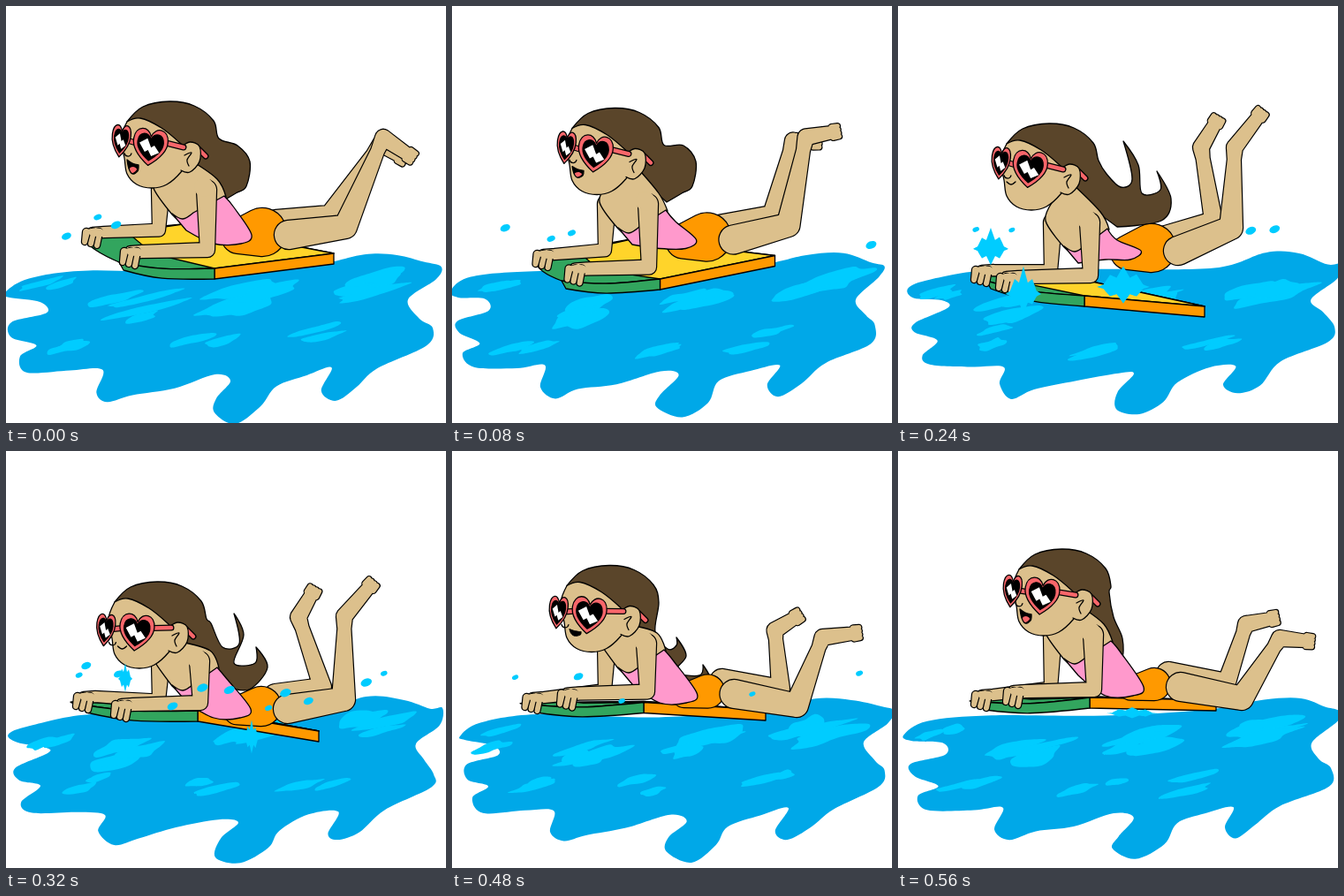
Recreate the animation shown at these times as an HTML page with a canvas. Size 498 by 472 pixels, loop 640 ms.

```html
<!DOCTYPE html>
<html lang="en">
<head>
<meta charset="utf-8">
<title>Bodyboard ride</title>
<style>
html, body { margin: 0; width: 100%; height: 100%; overflow: hidden; background: #fff; }
canvas { display: block; }
</style>
</head>
<body>
<canvas id="stage" width="498" height="472"></canvas>
<script>
const ctx = document.getElementById('stage').getContext('2d');
const STEP = 80;
const C = { sea: '#00a8e8', foam: '#00ccff', skin: '#dcc08c', hair: '#5a452a', red: '#f8666a',
  pink: '#ff99cc', orange: '#ff9900', yellow: '#ffd42a', green: '#32a55e' };

// Joints of the rider and corners of the board; everything else is built from them.
// hip: x, y, seat size; arm: hand x, elbow y; legs: knee, heel, toes; drops: left, middle, right.
const poses = [{
  head: [0, 0], nod: 0, smile: 1, shoulder: [227, 208], arm: [136, 276], hip: [318, 259, 27],
  leg: [[384, 250], [427, 149], [455, 168]], farLeg: [[366, 236], [424, 156], [446, 170]],
  nose: [95, 262], front: [128, 290], seam: [236, 297], tail: [371, 280], back: [200, 247],
  hair: '262,158 276,176 272,204 260,212 243,222!', swell: [-6, 4], splashes: [], drops: [3, 0, 0]
}, {
  head: [-2, 15], nod: 0, smile: .6, shoulder: [217, 240], arm: [133, 315], hip: [315, 270, 27],
  leg: [[377, 246], [374, 148], [406, 118]], farLeg: [[358, 236], [348, 149], [372, 137]],
  nose: [106, 312], front: [120, 332], seam: [235, 321], tail: [360, 285], back: [210, 280],
  hair: '246,182 260,202 276,188 262,149! 283,180 285,200 301,190 296,174! 313,200 296,230 245,237!',
  swell: [-8, -8], splashes: [[105, 342, 75, 70], [225, 350, 130, 30]], drops: [2, 0, 1]
}, {
  head: [-14, 25], nod: 0, smile: 0, shoulder: [217, 245], arm: [118, 305], hip: [315, 277, 27],
  leg: [[377, 251], [381, 160], [408, 125]], farLeg: [[357, 243], [343, 160], [359, 133]],
  nose: [92, 305], front: [100, 311], seam: [211, 328], tail: [347, 340], back: [215, 311],
  hair: '236,190 252,205 265,196 255,153! 272,180 276,212 297,208 293,187! 309,218 298,243 248,250!',
  swell: [6, -3], splashes: [[105, 275, 40, 25], [142, 326, 40, 32], [255, 318, 60, 26]], drops: [2, 0, 2]
}, {
  head: [-14, 40], nod: .7, smile: 0, shoulder: [219, 238], arm: [126, 285], hip: [317, 292, 22],
  leg: [[382, 281], [383, 187], [411, 154]], farLeg: [[358, 267], [331, 188], [346, 162]],
  nose: [85, 284], front: [86, 287], seam: [217, 294], tail: [354, 317], back: [217, 292],
  hair: '232,195 245,222 264,218 258,184! 269,208 258,240 282,240 283,222! 296,245 275,270 248,266!',
  swell: [-1, 0], splashes: [[135, 258, 16, 20], [278, 325, 18, 24]], drops: [3, 6, 2]
}, {
  head: [-14, 40], nod: 1, smile: 0, shoulder: [219, 228], arm: [126, 275], hip: [317, 283, 19],
  leg: [[391, 296], [407, 210], [447, 198]], farLeg: [[372, 276], [337, 210], [354, 188]],
  nose: [85, 288], front: [86, 290], seam: [217, 290], tail: [350, 304], back: [217, 289],
  hair: '230,205 244,224 254,220 254,211! 265,232 252,250 280,254 284,242! 292,260 270,264 248,262!',
  swell: [2, 0], splashes: [], drops: [3, 4, 1]
}, {
  head: [0, 3], nod: .2, smile: 1, shoulder: [221, 208], arm: [126, 270], hip: [318, 267, 18],
  leg: [[389, 280], [432, 212], [462, 215]], farLeg: [[372, 262], [394, 196], [422, 190]],
  nose: [92, 282], front: [94, 284], seam: [217, 279], tail: [360, 282], back: [217, 278],
  hair: '239,160 244,188 254,212 253,235 238,225!', swell: [4, -6],
  splashes: [[265, 297, 60, 8]], drops: [0, 0, 0]
}];

const SEA = points('4,322 30,309 100,299 230,300 350,295 410,280 450,281 480,291 497,293 492,309 463,332 474,350 487,364 482,382 428,406 402,430 378,442 364,432 376,408 345,413 311,428 296,450 266,467 240,458 244,440 262,420 242,416 195,428 150,437 122,446 107,432 114,410 80,410 30,410 20,396 40,381 14,372 12,358 50,344 45,334 12,330');
const FOAM = [[140, 342], [275, 330], [415, 315], [225, 382], [350, 378], [45, 325], [90, 375]];

function points(text) {
  return text.split(' ').map(token => {
    const p = token.replace('!', '').split(',').map(Number);
    p.sharp = token.endsWith('!');
    return p;
  });
}
const corner = (x, y) => Object.assign([x, y], { sharp: true });
const add = (p, x, y) => [p[0] + x, p[1] + y];
const mix = (a, b, t = .5) => a.map((v, i) => v + (b[i] - v) * t);

function between(a, b) {
  if (typeof a === 'number') return (a + b) / 2;
  if (Array.isArray(a)) return a.length === b.length ? a.map((v, i) => between(v, b[i])) : a;
  if (typeof a === 'string') return a;
  return Object.fromEntries(Object.keys(a).map(key => [key, between(a[key], b[key])]));
}

const [rise, crest, drop, dip, settle, glide] = poses;
const cycle = [rise, between(rise, crest), crest, drop, dip, settle, between(settle, glide), glide];

function random(seed) {
  let s = seed * 7919 + 17;
  return (low = 0, high = 1) => {
    s = (s * 16807) % 2147483647;
    return low + (high - low) * s / 2147483647;
  };
}

// Smooth curve through the points, straight tangents dropped at corners and open ends.
function trace(pts, closed = true) {
  const n = pts.length, path = new Path2D();
  const slope = i => pts[i].sharp || (!closed && (i === 0 || i === n - 1)) ? [0, 0]
    : [0, 1].map(k => (pts[(i + 1) % n][k] - pts[(i + n - 1) % n][k]) / 6);
  path.moveTo(...pts[0]);
  for (let i = 0; i < (closed ? n : n - 1); i++) {
    const j = (i + 1) % n, [a, b] = [pts[i], pts[j]], [s, t] = [slope(i), slope(j)];
    path.bezierCurveTo(a[0] + s[0], a[1] + s[1], b[0] - t[0], b[1] - t[1], b[0], b[1]);
  }
  return path;
}

function paint(path, fill, outline = true) {
  if (fill) { ctx.fillStyle = fill; ctx.fill(path); }
  if (outline) { ctx.strokeStyle = '#000'; ctx.lineWidth = 1.3; ctx.stroke(path); }
}

function polygon(...pts) {
  const path = new Path2D();
  pts.forEach(p => path.lineTo(p[0], p[1]));
  path.closePath();
  return path;
}

function bar(from, to) {
  const path = polygon(from, to);
  for (const [color, width] of [['#000', 7], [C.red, 4.5]]) {
    ctx.strokeStyle = color;
    ctx.lineWidth = width;
    ctx.stroke(path);
  }
}

// Tapered segment around two joints [x, y, radius].
function capsule(path, [ax, ay, ar], [bx, by, br]) {
  const angle = Math.atan2(by - ay, bx - ax);
  const spread = Math.acos(Math.max(-1, Math.min(1, (ar - br) / Math.hypot(bx - ax, by - ay))));
  const part = new Path2D();
  part.arc(ax, ay, ar, angle + spread, angle - spread + 2 * Math.PI);
  part.arc(bx, by, br, angle - spread, angle + spread);
  part.closePath();
  path.addPath(part);
}

function limb(joints, color = C.skin, path = new Path2D()) {
  joints.slice(1).forEach((joint, i) => capsule(path, joints[i], joint));
  ctx.strokeStyle = '#000';
  ctx.lineWidth = 2.4;
  ctx.stroke(path);
  paint(path, color, false);
}

function drawLeg(hip, [knee, heel, toe], thick) {
  const angle = Math.atan2(toe[1] - heel[1], toe[0] - heel[0]);
  const toes = new Path2D();
  for (let i = -1.5; i <= 1.5; i++) {
    const base = add(toe, -Math.sin(angle) * i * 4, Math.cos(angle) * i * 4);
    capsule(toes, [...base, 3], [...add(base, Math.cos(angle) * 7, Math.sin(angle) * 7), 2.6]);
  }
  limb([[...hip, thick + 3], [...knee, thick], [...mix(knee, heel, .85), 7.5], [...heel, 9], [...toe, 7]], C.skin, toes);
}

function drawArm(shoulder, elbow, hand, thick) {
  limb([[...shoulder, thick + 2], [...elbow, thick - 1], [...add(hand, 18, -4), thick - 2], [...add(hand, 5, -3), thick - 2]]);
  for (let i = 2; i >= 0; i--)
    limb([[...add(hand, i * 7 - 2, -4), 4], [...add(hand, i * 7 - 4, thick - 1 + i * 2), 3]]);
  paint(trace([add(hand, 0, -7), add(hand, 14, -8), add(hand, 21, 0), add(hand, 4, 0)]), C.skin, false);
}

function heart(w, h) {
  const path = new Path2D();
  path.moveTo(0, h * .5);
  for (const side of [-1, 1]) {
    const x = side * w, up = side < 0;
    const knots = [[.2, .36], [.52, .1], [.5, -.2], [.48, -.56], [.1, -.6]].map(([u, v]) => [u * x, v * h]);
    if (!up) knots.reverse();
    path.bezierCurveTo(...knots[0], ...knots[1], ...knots[2]);
    path.bezierCurveTo(...knots[3], ...knots[4], 0, up ? -h * .3 : h * .5);
  }
  return path;
}

function drawLens([x, y], w, h) {
  ctx.save();
  ctx.translate(x, y);
  ctx.rotate(.12);
  paint(heart(w, h), C.red);
  paint(heart(w * .75, h * .73), '#000');
  paint(polygon(...[[-.32, -.1], [-.1, -.24], [.03, 0], [.12, -.06], [.28, .12], [.06, .24], [-.05, .08], [-.14, .14]]
    .map(([u, v]) => [u * w, v * h])), '#fff', false);
  ctx.restore();
}

function drawHead({ head: [dx, dy], nod, smile }) {
  ctx.save();
  ctx.translate(dx, dy);
  bar([218, 162], [226, 170]);
  paint(trace(points('137,131! 152,127 176,138 198,156! 205,175 198,188 182,202 165,206 148,202 137,190 134,172 130,150')), C.skin);
  paint(trace(points('198,160 208,154 219,159 219,176 208,188 198,186'), false), C.skin);
  paint(trace(points('202,169 210,166 205,174 207,181'), false));

  const left = [130 - 5 * nod, 153 + 14 * nod], right = [163 - 2 * nod, 160 + 8 * nod];
  const nose = new Path2D();
  nose.arc(left[0] + 8, left[1] + 13, 4, .2, 3);
  paint(nose);
  bar(add(right, 18, -5), [201, 160]);
  bar(add(left, 7, -1), add(right, -16, -5));
  drawLens(left, 21, 36);
  drawLens(right, 39, 41);

  ctx.translate(137 + 5 * nod, 174 + 10 * nod);
  if (smile > .3) {
    ctx.scale(1, smile);
    paint(trace(points('0,0! 6,4 13,6! 12,13 6,16 2,10')), '#000');
    if (smile > .7) paint(trace(points('3,10 7,8 11,11 6,15')), C.red, false);
  } else paint(trace(points('0,0 5,3 10,0'), false));
  ctx.restore();
}

function drawSea({ swell: [sx, sy] }, step) {
  paint(trace(SEA.map(([x, y], i) => [
    x + sx + 2 * Math.sin(i * 1.7 + step * 2.4),
    y + sy * (y - 270) / 190 + 2 * Math.cos(i * 2.3 + step)
  ])), C.sea, false);

  const rnd = random(step + 3);
  FOAM.forEach(([x, y], i) => {
    for (let k = 0; k < (i < 3 ? 4 : 2); k++) {
      const length = rnd(14, i < 3 ? 52 : 30), thick = rnd(4, i < 3 ? 11 : 6), pts = [];
      const cx = x + rnd(-25, 25), cy = y + rnd(-12, 12);
      for (let a = 0; a < 10; a++) {
        const turn = a * Math.PI / 5, r = rnd(.65, 1.15), u = Math.cos(turn) * length * r;
        pts.push([cx + u, cy + Math.sin(turn) * thick * r - u * .25]);
      }
      paint(trace(pts), C.foam, false);
    }
  });
}

function drawSpray({ splashes, drops }, step) {
  const rnd = random(step + 11);
  for (const [x, y, w, h] of splashes) {
    const rim = (side, reach) => Array.from({ length: 9 }, (_, i) => {
      const t = i / 8, rise = Math.sin(t * Math.PI) ** 1.5 * reach * (i % 2 ? .45 : rnd(.8, 1));
      return corner(x + side * (t - .5) * w, y - side * rise);
    });
    paint(trace([...rim(1, h), ...rim(-1, Math.min(h, 30) * .8)]), C.foam, false);
  }
  const zones = [[60, 130, 238, 264], [155, 370, 268, 300], [398, 438, 250, 272]];
  zones.forEach(([x0, x1, y0, y1], z) => {
    for (let i = 0; i < drops[z]; i++) {
      const blob = new Path2D(), r = rnd(3, 5.5);
      blob.ellipse(x0 + (x1 - x0) * (i + rnd()) / drops[z], rnd(y0, y1), r * 1.2, r * .8, -.4, 0, 7);
      paint(blob, C.foam, false);
    }
  });
}

function drawBoard({ nose, front, seam, tail, back }) {
  const sharp = p => corner(p[0], p[1]), under = p => corner(p[0], p[1] + 12);
  const belly = add(mix(front, seam, .45), 0, 4);
  const split = mix(nose, back, .4);
  paint(trace([nose, sharp(back), sharp(tail), sharp(seam), belly, front]), C.green);
  paint(polygon(split, back, tail, seam, mix(mix(front, seam, .5), split, .35)), C.yellow);
  paint(polygon(seam, tail, under(tail), under(seam)), C.orange);
  paint(trace([sharp(front), belly, sharp(seam), under(seam), add(belly, 0, 11), sharp(add(front, 5, 9))]), C.green);
}

function drawBody(pose) {
  const { head: [dx, dy], shoulder, arm: [handX, elbowY], hip, nose, front } = pose;
  const [sx, sy] = shoulder, [hx, hy, seat] = hip;
  const farDrop = (nose[1] - front[1]) * .8;

  const cap = points('137,131! 155,114 185,108 213,113 235,130 241,150').map(p =>
    Object.assign(add(p, dx, dy), { sharp: p.sharp }));
  paint(trace([...cap, ...points(pose.hair), [224 + dx, 200 + dy], [190 + dx, 192 + dy]]), C.hair);

  drawLeg([hx - 12, hy - 15], pose.farLeg, 10);
  limb([[hx - 55, hy + 2, seat * .7], [hx - 28, hy - 3, seat]], C.orange);
  drawLeg([hx + 2, hy], pose.leg, 13);

  drawArm([175, sy], [173, elbowY + farDrop], add(nose, -2, -2), 8);
  paint(trace([corner(176, dy + 195), [167, sy - 2], corner(188, sy + 28), [212, sy + 40], corner(sx + 22, sy + 8),
    [sx + 12, sy - 12], corner(dx + 211, dy + 176)], false), C.skin);
  paint(trace([corner(188, sy + 27), [200, sy + 33], corner(212, sy + 26), corner(sx + 20, sy + 7),
    [sx + 31, sy + 20], [hx - 40, hy], [hx - 52, hy + 10], [235, hy + 10], corner(204, sy + 46)]), C.pink);
  drawArm(shoulder, [sx + 1, elbowY], [handX, elbowY + 6], 9);

  const blend = new Path2D();
  blend.arc(sx - 3, sy - 3, 11, 0, 7);
  paint(blend, C.skin, false);
}

function drawFrame(pose, step) {
  ctx.fillStyle = '#fff';
  ctx.fillRect(0, 0, 498, 472);
  ctx.lineJoin = ctx.lineCap = 'round';
  drawSea(pose, step);
  drawBoard(pose);
  drawBody(pose);
  drawHead(pose);
  drawSpray(pose, step);
}

const start = performance.now();
let shown = -1;
function tick() {
  const step = Math.floor((performance.now() - start) / STEP) % cycle.length;
  if (step !== shown) drawFrame(cycle[shown = step], step);
  requestAnimationFrame(tick);
}
tick();
</script>
</body>
</html>
```
